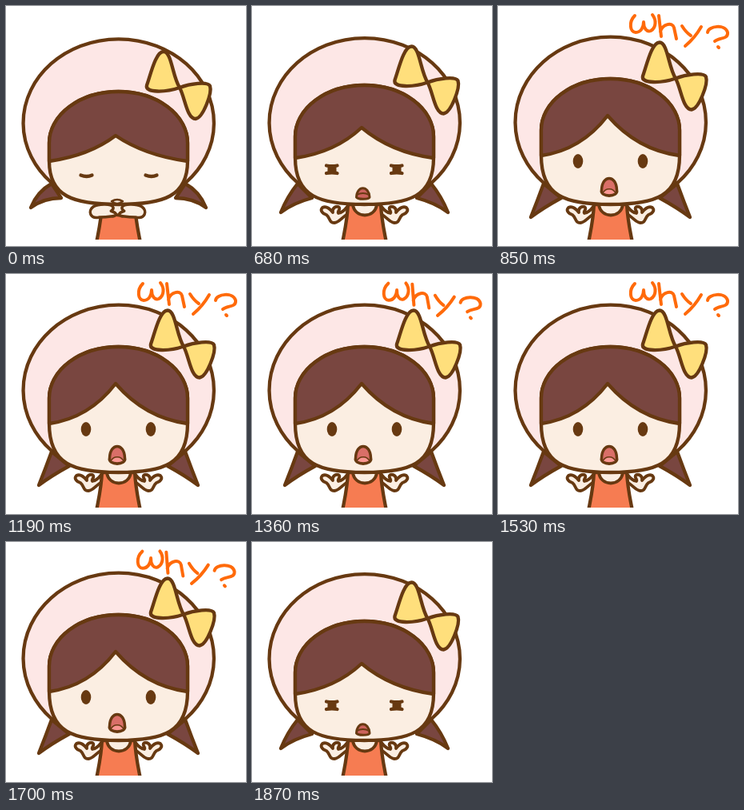
An HTML page for the animation above (2040 ms loop, 300 by 300 pixels).

```html
<!DOCTYPE html>
<html lang="en">
<head>
<meta charset="utf-8">
<title>Why?</title>
<style>
html, body { margin: 0; width: 100%; height: 100%; overflow: hidden; background: #fff; }
svg { display: block; width: 300px; height: 300px; }
</style>
</head>
<body>
<svg id="stage" viewBox="0 0 300 300" stroke-linecap="round" stroke-linejoin="round"></svg>
<script>
const LINE = '#673911', HAIR = '#794640', SKIN = '#fbeee2', YELLOW = '#ffdf7c';
const stage = document.getElementById('stage');

const path = (d, fill = 'none', width = 4.3, stroke = LINE) =>
  `<path d="${d}" fill="${fill}" stroke="${stroke}" stroke-width="${width}"/>`;
const group = (transform, body) => `<g transform="${transform}">${body}</g>`;
const mirror = (body, axis = 140.5) => body + group(`translate(${axis * 2}) scale(-1 1)`, body);
const eyePair = eye => group('translate(100 0)', eye) + group('translate(181 0)', eye);

const raisedArm = path('M118 261C112 265 108 271 103 271C96 271 98 265 93 261C87 259 85 255 88 252C92 250 97 253 101 258C100 253 104 250 108 251C112 253 106 257 108 259C113 258 116 255 119 251', SKIN, 3.8);
const foldedHand = path('M117 264C105 267 102 256 109 251C116 247 133 247 134 252C135 256 128 256 133 257C140 259 138 263 131 263C125 264 121 264 117 264Z', SKIN, 3.5);

const dress =
  path('M120 248C119 268 116 280 113 296H168C165 280 162 268 161 248Z', '#f67c52') +
  path('M126 248C128 266 154 266 156 248Z', SKIN, 3.8);

const closedEye = path('M-6.5 211.5Q1 214.5 7.5 211.5');
const squeezedEye =
  path('M-7 199.5Q0 201 6.5 199.5M-7 209Q0 207.5 6.5 209') +
  `<rect x="-5.5" y="199" width="11" height="11" fill="${LINE}"/>`;
const openEye = `<ellipse cy="194" rx="6.3" ry="9" fill="${LINE}"/>`;

const pursedMouth = path('M132 244Q139 240 146 244Q139 250 132 244Z', SKIN, 2.5);
const flatMouth =
  path('M130.5 239C131 224 146 224 147 239C146 242 132 242 130.5 239Z', '#cb635d', 3) +
  path('M131 236Q139 232 146 236', 'none', 1.8);
const wideMouth =
  path('M129.5 230C130 210.5 148 210.5 148.5 230C151 239.5 127 239.5 129.5 230Z', '#d96f68', 3.5) +
  path('M131 234C134 227 144 227 147 234Q139 238 131 234Z', '#f99692', 1.6);

const bow =
  path('M217 102C208 88 207 57 197 57C187 57 181 85 176 99C173 109 200 108 217 102Z', YELLOW) +
  path('M217 102C230 97 252 94 255 100C258 109 246 140 237 141C226 141 224 115 217 102Z', YELLOW);

const word = path(
  'M171 12C163 20 165 33 172 33C179 33 182 26 182 20C182 28 186 33 191 31C198 27 198 17 193 11' +
  'M201 12L204 38M203 32C206 22 218 20 220 27L223 41' +
  'M230 25Q235 33 241 37M254 26Q246 40 234 50' +
  'M262 33C263 25 284 22 287 33C288 42 277 39 271 44M275 51L276 52',
  'none', 4, '#ff6a0a');

// top: fringe arc, side: fringe ends, part: hair parting, tip: pigtail tip
const poses = {
  rest:  { top: 107, side: 194, part: 162, tip: [31, 252], root: 69, hat: 105, bow: [0, 0], eye: closedEye, mouth: pursedMouth, folded: true },
  wince: { top: 99, side: 190, part: 152, tip: [36, 258], root: 75, hat: 105.7, bow: [2.5, -6.5], eye: squeezedEye, mouth: flatMouth },
  ask:   { top: 91, side: 187, part: 137, tip: [41, 264], root: 79, hat: 106.5, bow: [5, -11.5], eye: openEye, mouth: wideMouth }
};

function drawGirl(p) {
  const [x, y] = p.tip;
  const crown = `M54 ${p.side}V${p.top + 64}A86.5 64 0 0 1 227 ${p.top + 64}V${p.side}`;
  const pigtail = path(`M57 222Q${x + 8} ${y - 20} ${x} ${y}Q${x + 16} ${y - 12} ${p.root} 240Z`, HAIR);
  return path(`M57 221A119.2 ${p.hat} 0 1 1 224.5 221Z`, '#fde7e6') +
    mirror(pigtail) +
    (p.folded ? '' : mirror(raisedArm)) + dress +
    path(`${crown}C227 238 197 248 140.5 248S54 238 54 ${p.side}Z`, SKIN) +
    path(`${crown}Q174 ${p.side - 7} 137 ${p.part}Q104 ${p.side - 7} 54 ${p.side}Z`, HAIR) +
    eyePair(p.eye) + p.mouth +
    group(`translate(${p.bow})`, bow) +
    (p.folded ? mirror(foldedHand, 139.5) : '') +
    '<rect y="292" width="300" height="8" fill="#fff"/>';
}

const { rest, wince, ask } = poses;
const quiet = drawGirl(rest);
const pained = drawGirl(wince);
const asking = drawGirl(ask);
const wordUp = asking + word;
const wordDown = asking + group('translate(-1 0) rotate(2 180 22)', word);

const STEP = 170, STEPS = 12;
let start, shown;

function pictureAt(step) {
  if (step < 4) return quiet;
  if (step === 4 || step === 11) return pained;
  return step % 2 ? wordUp : wordDown;
}

function tick(now) {
  start ??= now;
  const picture = pictureAt(Math.floor((now - start) / STEP) % STEPS);
  if (picture !== shown) stage.innerHTML = shown = picture;
  requestAnimationFrame(tick);
}
stage.innerHTML = shown = quiet;
requestAnimationFrame(tick);
</script>
</body>
</html>
```
